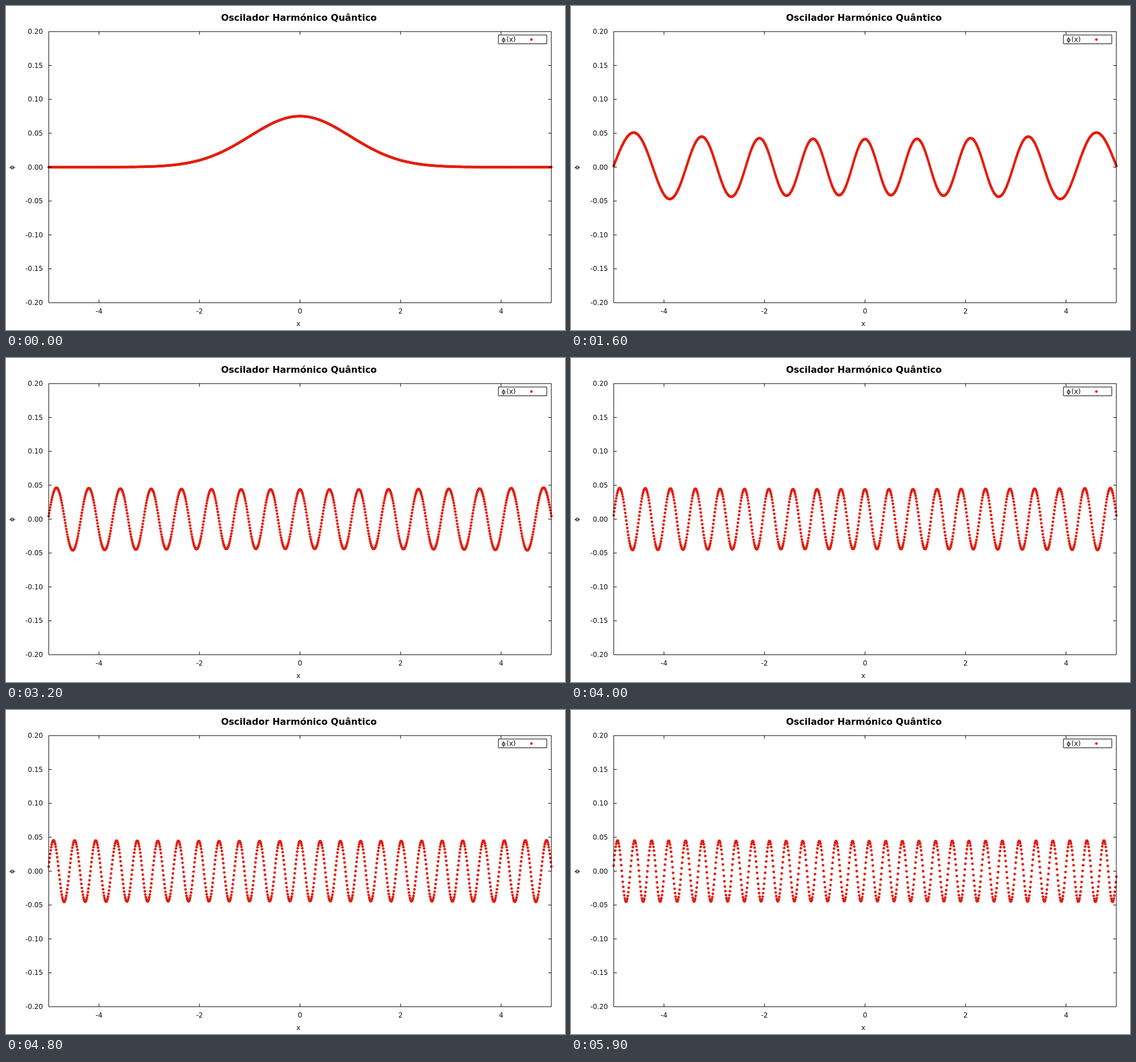
An HTML page with a canvas for the animation above (6 s loop, 982 by 570 pixels).

```html
<!DOCTYPE html>
<html lang="pt">
<head>
<meta charset="utf-8">
<title>Oscilador Harmónico Quântico</title>
<style>
  html, body { margin: 0; width: 100%; height: 100%; overflow: hidden; background: #fff; }
  canvas, svg { position: absolute; left: 0; top: 0; width: 982px; height: 570px; }
  text { font: 12px "DejaVu Sans", sans-serif; fill: #111; }
  .title { font-size: 16px; font-weight: bold; fill: #000; }
  .phi { font-size: 11px; fill: #000; }
  path { fill: none; stroke: #000; stroke-width: 1; }
</style>
</head>
<body>
<canvas id="plot" width="982" height="570"></canvas>
<svg id="axes" viewBox="0 0 982 570"></svg>
<script>
const LEFT = 75, RIGHT = 958, TOP = 45, BOTTOM = 522;
const STATES = 60, STEP = 100, POINTS = 1000, DX = 10 / (POINTS - 1);
const RED = '#e51e10', RADIUS = 2.35;
const px = x => LEFT + (x + 5) / 10 * (RIGHT - LEFT);
const py = v => TOP + (0.2 - v) / 0.4 * (BOTTOM - TOP);

// Axes, labels and legend
const svg = document.getElementById('axes');
const label = (x, y, s, anchor = 'middle', extra = '') =>
  `<text x="${x}" y="${y}" text-anchor="${anchor}" ${extra}>${s}</text>`;

function drawAxes() {
  let d = `M${LEFT} ${TOP}H${RIGHT}V${BOTTOM}H${LEFT}Z`;
  let texts = '';
  for (let x = -4; x <= 4; x += 2) {
    d += `M${px(x)} ${BOTTOM}v-5.5M${px(x)} ${TOP}v5.5`;
    texts += label(px(x), 541, x);
  }
  for (let i = -4; i <= 4; i++) {
    const v = i * 0.05;
    if (Math.abs(i) < 4) d += `M${LEFT} ${py(v)}h5.5M${RIGHT} ${py(v)}h-5.5`;
    texts += label(65, Math.round(py(v) + 4), v.toFixed(2), 'end');
  }
  d += 'M865 51H950V66.5H865Z';
  texts += label(514.5, 26, 'Oscilador Harmónico Quântico', 'middle', 'class="title"')
    + label(513.5, 563, 'x')
    + label(0, 0, 'ϕ', 'middle', 'class="phi" transform="translate(14 284) rotate(-90)"')
    + label(870.5, 62.5, 'ϕ', 'start', 'class="phi"')
    + label(879, 63, '(x)', 'start');
  svg.innerHTML = `<path d="${d}"/>${texts}<circle cx="923" cy="59" r="${RADIUS}" fill="${RED}"/>`;
}

// Harmonic well with hard walls one step beyond x = ±5
const xs = Array.from({ length: POINTS }, (_, i) => -5 + i * DX);

function shoot(energy) {
  const u = [1e-6];
  let prev = 0;
  for (let i = 0; i < POINTS; i++) {
    u.push((2 + DX * DX * (xs[i] * xs[i] - 2 * energy)) * u[i] - prev);
    prev = u[i];
  }
  return u;
}

function nodes(u) {
  let count = 0;
  for (let i = 1; i < u.length; i++) if (u[i] < 0 !== u[i - 1] < 0) count++;
  return count;
}

function eigenstate(n) {
  let lo = 0, hi = 400;
  for (let i = 0; i < 48; i++) {
    const mid = (lo + hi) / 2;
    if (nodes(shoot(mid)) > n) hi = mid; else lo = mid;
  }
  // The left half is numerically stable; parity gives the right half
  const u = shoot(lo), parity = n % 2 ? -1 : 1;
  const full = xs.map((_, i) => i < POINTS / 2 ? u[i] : parity * u[POINTS - 1 - i]);
  const norm = Math.sqrt(full.reduce((sum, v) => sum + v * v, 0));
  return full.map(v => v / norm);
}

const states = Array.from({ length: STATES }, (_, n) => eigenstate(n));
const ctx = document.getElementById('plot').getContext('2d');
let shown = -1;

function drawState(n) {
  ctx.clearRect(0, 0, 982, 570);
  ctx.fillStyle = RED;
  states[n].forEach((v, i) => {
    ctx.beginPath();
    ctx.arc(px(xs[i]), py(v), RADIUS, 0, 2 * Math.PI);
    ctx.fill();
  });
}

const start = performance.now();
function tick() {
  const n = Math.floor((performance.now() - start) / STEP) % STATES;
  if (n !== shown) drawState(shown = n);
  requestAnimationFrame(tick);
}

drawAxes();
tick();
</script>
</body>
</html>
```
